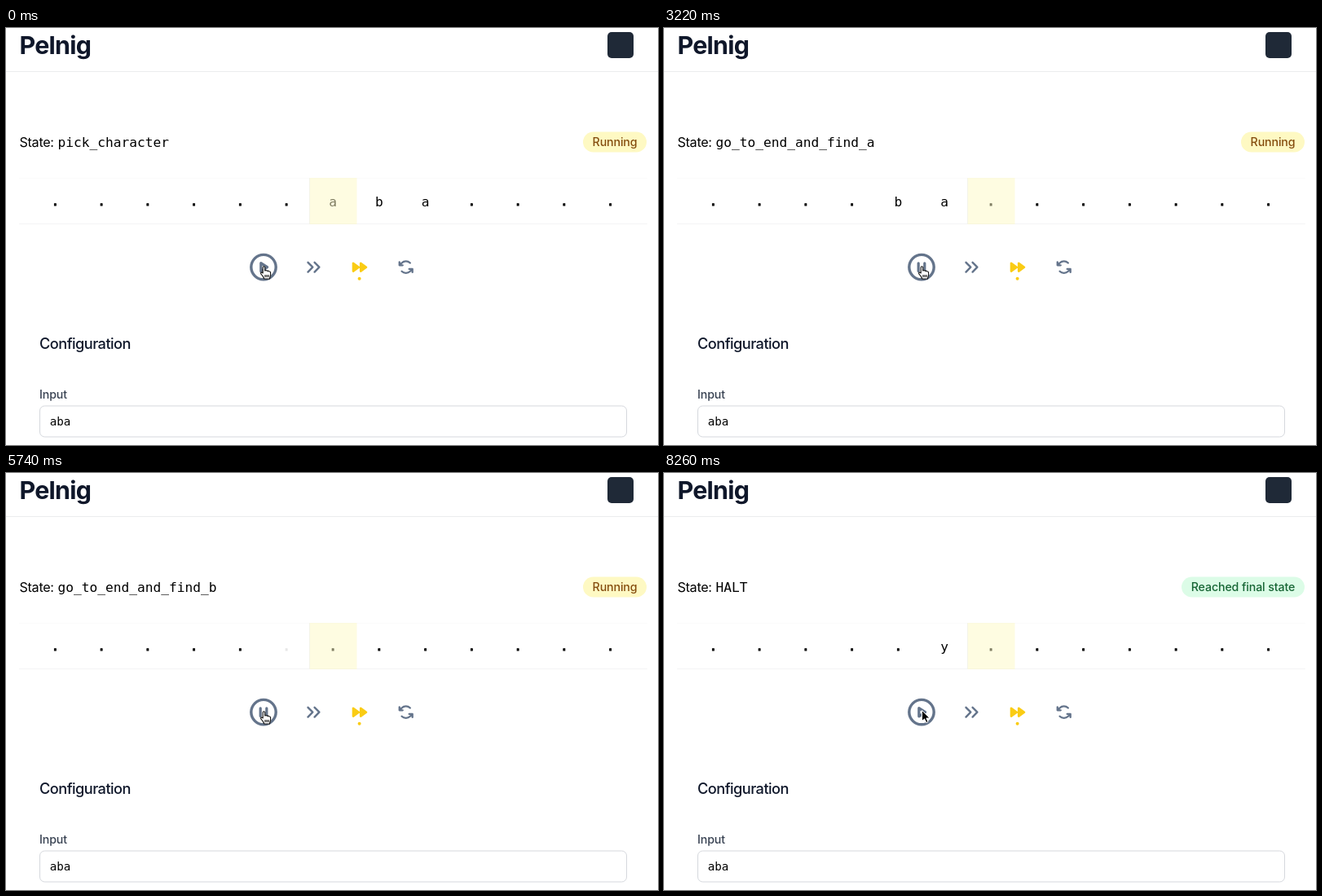
Animation, 800 px wide and 512 px high, one loop 8.54 s. Source, as an HTML page:

```html
<!DOCTYPE html>
<html lang="en">
<head>
<meta charset="utf-8">
<title>Tape machine</title>
<style>
  html, body { margin: 0; width: 100%; height: 100%; overflow: hidden; background: #fff; }
  svg { display: block; width: 800px; height: 512px; }
  text { font-family: Inter, "Open Sans", sans-serif; font-size: 16.2px; fill: #000; }
  .mono { font-family: "DejaVu Sans Mono", "Liberation Mono", monospace; }
  .title { font-size: 30.4px; font-weight: 700; letter-spacing: -.025em; fill: #0f172a; }
  .heading { font-size: 18.2px; font-weight: 500; letter-spacing: -.03em; fill: #0f172a; }
  .label { letter-spacing: -.02em; }
  .small { font-size: 14.2px; font-weight: 500; letter-spacing: -.008em; }
  .grey { fill: #374151; }
  .input { font-size: 14.2px; }
  .mid { text-anchor: middle; }
  .blank { stroke: #000; stroke-width: .9px; }
  .line { fill: none; stroke: #64748b; stroke-linecap: round; stroke-linejoin: round; }
</style>
</head>
<body>
<svg viewBox="0 0 800 512">
  <defs><clipPath id="window"><rect x="16" y="184" width="771" height="57"/></clipPath></defs>

  <text class="title" x="16.5" y="32">Pelnig</text>
  <rect x="738" y="5" width="32" height="32" rx="5" fill="#1f2937"/>
  <path d="M0 53.5H800" stroke="#ebecee"/>

  <text class="label" x="16.5" y="145.7">State:</text>
  <text id="state" class="mono" x="63.5" y="145.7"></text>
  <rect id="pill" y="127.5" height="25" rx="12.5"/>
  <text id="status" class="small mid" y="145.2"></text>

  <path d="M16 184.5H787" stroke="#fbfbfb"/>
  <path d="M16 240.5H787" stroke="#f4f4f5"/>
  <g id="tape" clip-path="url(#window)"></g>
  <rect x="372.5" y="184" width="58" height="57" fill="#fef9c3" opacity=".5"/>
  <path d="M372.5 184V241" stroke="#f4f4e8"/>

  <circle class="line" cx="316" cy="293.6" r="15.2" stroke-width="3.4"/>
  <path id="play" class="line" d="M312.8 288.6V298.8L320.6 293.7Z" stroke-width="3.2"/>
  <path id="pause" class="line" d="M312.2 288.8V298.4M319.8 288.8V298.4" stroke-width="3.2"/>
  <path class="line" d="M370.5 287.8L376.3 293.7L370.5 299.6M378.6 287.8L384.4 293.7L378.6 299.6" stroke-width="2.4"/>
  <path d="M426 288.8V298.6L432.8 293.7ZM435.2 288.8V298.6L442 293.7Z" fill="#facc15" stroke="#facc15" stroke-width="2.6" stroke-linejoin="round"/>
  <circle cx="433.6" cy="307.7" r="2" fill="#facc15"/>
  <path class="line" transform="translate(480.1 283) scale(.083)" stroke-width="28"
    d="M80 100H32V52M190 66A88 88 0 0 0 66 66L32 100M176 156H224V204M66 190A88 88 0 0 0 190 190L224 156"/>

  <path id="hand" fill="#fff" stroke="#111" stroke-width="1.1" stroke-linejoin="round"
    d="M315.2 301V294.2Q315.2 292.8 316.4 292.8T317.7 294.2V298Q319.9 296.8 320.3 298.4Q322.2 297.6 322.5 299Q324.6 298.6 324.6 300.4V303.4L323.4 308H316.9Q315.8 305 312.8 301.8Q312.2 300.4 313.4 300.1Q314.4 300 315.2 301ZM318 303V306M320 303V306M322 303V306"/>
  <path id="arrow" fill="#000" stroke="#fff" d="M316.5 291.5V304.6L319.6 301.9L321.8 306.6L324 305.6L321.9 301H326Z"/>

  <text class="heading" x="41" y="393.8">Configuration</text>
  <text class="small grey" x="41" y="455.2">Input</text>
  <rect x="41.5" y="464" width="720" height="38" rx="6" fill="#fff" stroke="#d5d8dd"/>
  <text class="mono input" x="53.7" y="488">aba</text>
</svg>
<script>
const LOOP = 8540, TICK = 70;
const START = 1890, STEP = 514, MOVE = 122, FADE = 230;
const PAUSE_ON = 490;
const PITCH = 56.77, CENTER = 401;

// Each step: next state, head move, symbol written (if it changes).
const steps = [
  ['go_to_end_and_find_a', 1, '.'],
  ['go_to_end_and_find_a', 1],
  ['go_to_end_and_find_a', 1],
  ['is_a', -1],
  ['go_to_beginning', -1, '.'],
  ['go_to_beginning', -1],
  ['pick_character', 1],
  ['go_to_end_and_find_b', 1, '.'],
  ['is_b', -1],
  ['HALT', 1, 'y']
];
const DONE = START + steps.length * STEP;

const byId = id => document.getElementById(id);
const clamp = v => Math.max(0, Math.min(1, v));
const smooth = p => p * p * (3 - 2 * p);
const show = (id, on) => byId(id).setAttribute('visibility', on ? 'visible' : 'hidden');

const cells = [];
for (let i = -8; i <= 11; i++) {
  const node = document.createElementNS('http://www.w3.org/2000/svg', 'text');
  byId('tape').append(node);
  cells.push({ i, node });
}

function setStatus(label, left, back, ink) {
  byId('pill').setAttribute('x', left);
  byId('pill').setAttribute('width', 786 - left);
  byId('pill').setAttribute('fill', back);
  byId('status').setAttribute('x', (left + 786) / 2);
  byId('status').style.fill = ink;
  byId('status').textContent = label;
}

function render(t) {
  let state = 'pick_character', head = 0, offset = 0;
  const symbols = { 0: 'a', 1: 'b', 2: 'a' }, opacity = {};

  steps.forEach(([next, move, write], k) => {
    const age = t - START - k * STEP;
    if (age < 0) return;
    state = next;
    if (write) {
      // The old symbol fades out before the new one fades in.
      const fade = age / FADE;
      if (fade >= 1) symbols[head] = write;
      opacity[head] = clamp(Math.abs(1 - fade));
    }
    head += move;
    offset += move * smooth(clamp(age / MOVE));
  });

  for (const { i, node } of cells) {
    const symbol = symbols[i] || '.', blank = symbol === '.';
    node.textContent = symbol;
    node.setAttribute('class', blank ? 'mono mid blank' : 'mono mid');
    node.setAttribute('x', CENTER + (i - offset) * PITCH);
    node.setAttribute('y', blank ? 217.7 : 218.5);
    node.setAttribute('opacity', opacity[i] ?? 1);
  }

  const done = t >= DONE, paused = t >= PAUSE_ON && !done;
  byId('state').textContent = state;
  if (done) setStatus('Reached final state', 635, '#dcfce7', '#166534');
  else setStatus('Running', 708, '#fef9c3', '#854d0e');
  show('pause', paused);
  show('play', !paused);
  show('hand', !done);
  show('arrow', done);
}

const origin = performance.now();
function frame() {
  const t = (performance.now() - origin) % LOOP;
  render(Math.floor(t / TICK) * TICK);
  requestAnimationFrame(frame);
}
frame();
</script>
</body>
</html>
```
